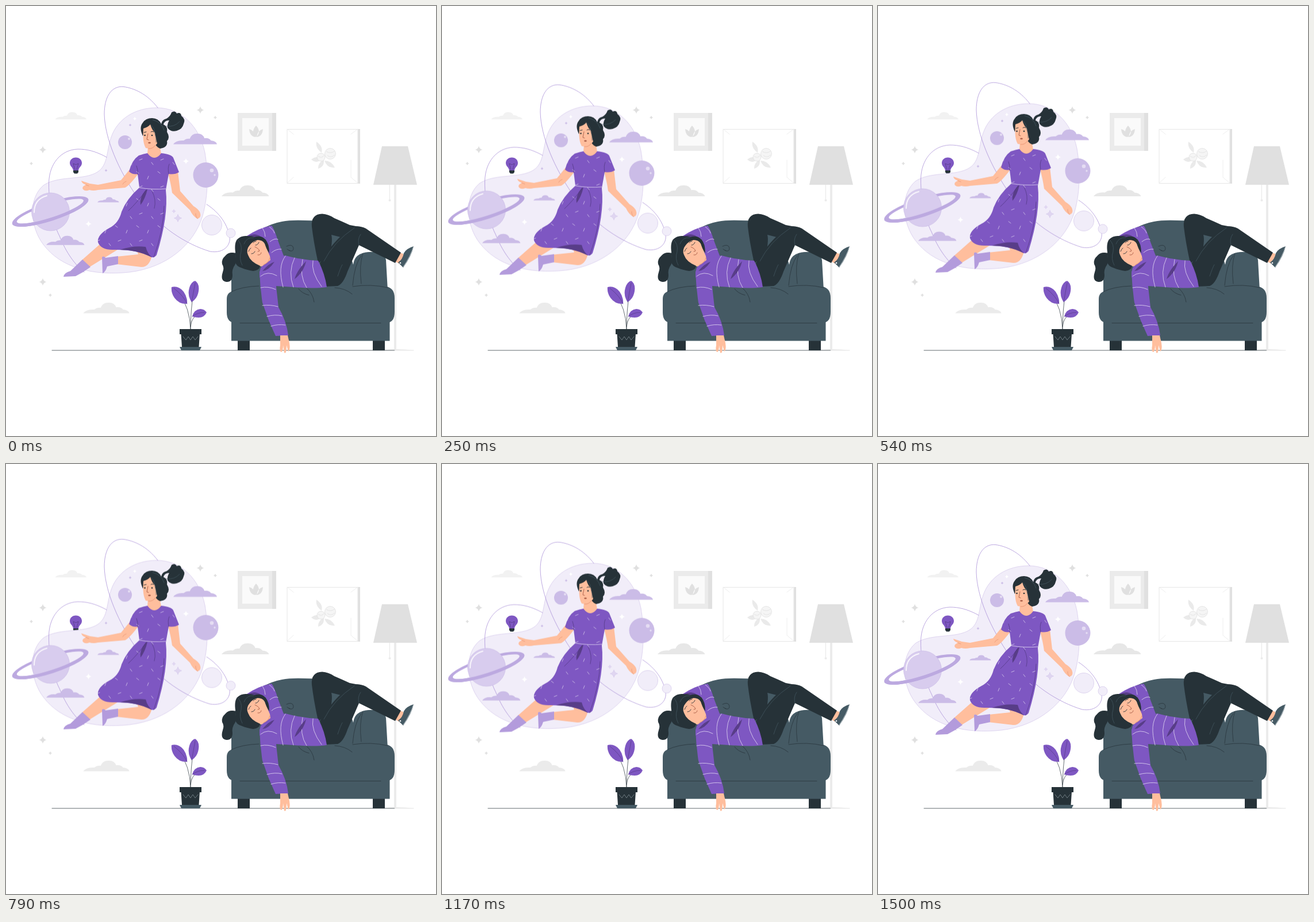
An HTML page without scripts for the animation above (1.54 s loop, 748 by 748 pixels).

```html
<!DOCTYPE html>
<html lang="en">
<head>
<meta charset="utf-8">
<title>Daydream</title>
<style>
  html, body { margin: 0; width: 100%; height: 100%; overflow: hidden; background: #fff; }
  svg { display: block; width: 100%; height: 100%; }
  .dream { animation: float 1540ms linear infinite; }
  @keyframes float {
    0%, 97.4%, 100% { transform: translateY(0); }
    48.7% { transform: translateY(-10px); }
  }
  .purple { fill: #7e57c2; }
  .deep { fill: #583d88; }
  .lilac { fill: #cbbce7; }
  .pale { fill: #e5ddf3; }
  .dark { fill: #263238; }
  .slate { fill: #455a64; }
  .skin { fill: #ffbe9d; }
  .grey { fill: #e0e0e0; }
  .mist { fill: #ebebeb; }
  .white { fill: #fff; }
  .line { fill: none; stroke-linecap: round; stroke-linejoin: round; }
  .ink { stroke: #263238; }
  .orbit { stroke: #ab92d8; stroke-width: .8; }
  .stripe { stroke: #d8ccee; stroke-width: .9; }
  .soft { stroke: #e6e6e6; }
  .seam { stroke: #455a64; stroke-width: .7; }
</style>
</head>
<body>
<svg viewBox="0 0 748 748">
  <defs>
    <path id="cloud" d="M0 19.500Q5 12 19 13Q24 9 30 10Q34 0 45 1Q54 1 57 9Q65 8 69 13Q79 14 80 19.500Z"/>
    <path id="spark" d="M0-6.500Q1.200-1.200 6.500 0Q1.200 1.200 0 6.500Q-1.200 1.200-6.500 0Q-1.200-1.200 0-6.500Z"/>
    <path id="dress" d="M246 256Q258 272 270 256Q288 258 291 264L301 289Q293 294 283 292L278 320Q283 365 262 433Q259 438 253 437Q228 423 185 424Q165 424 160 411Q158 398 180 386Q196 378 201 358Q210 335 232 316L229 292Q221 294 214 288Q219 268 231 260Q240 257 246 256Z"/>
    <pattern id="flecks" width="37" height="47" patternUnits="userSpaceOnUse">
      <path class="line" stroke="#d8ccee" stroke-width=".8" d="M5 6l4 3M26 14l-2 5M10 33l5-2M31 37l3 4"/>
    </pattern>
    <path id="ring" fill="#bca9e0" fill-rule="evenodd" transform="rotate(-18 77 357.500)" d="M7.500 357.500a69.500 16.300 0 0 1 139 0a69.500 16.300 0 0 1-139 0ZM16 357a61 11 0 0 0 122 0a61 11 0 0 0-122 0Z"/>
    <clipPath id="ringFront"><path d="M0 382.500L155 332V400H0Z"/></clipPath>
  </defs>

  <!-- room -->
  <g id="wall">
    <path class="mist" d="M403 186H464V252H403Z"/>
    <path class="grey" d="M463 186H470V252H463Z"/>
    <path fill="#fafafa" d="M411 195H457V243H411Z"/>
    <path class="grey" d="M435 208Q445 219 435 228Q425 219 435 208ZM423 214Q432 216 434 228Q424 227 423 214ZM447 214Q438 216 436 228Q446 227 447 214Z"/>

    <path class="grey" d="M611 214H616V309H611Z"/>
    <path class="soft" fill="#fff" d="M489 214.500H612V308.500H489Z"/>
    <path class="line" stroke="#eee" d="M489 214L500 223M612 214L600 223M489 308L500 298M612 308L600 298V268"/>
    <g fill="#eaeaea">
      <path d="M540 236Q552 244 549 255Q538 248 540 236ZM531 267Q541 259 548 267Q540 275 531 267ZM543 283Q543 271 553 268Q554 280 543 283ZM554 269Q566 269 572 281Q559 283 554 269Z"/>
      <g fill="#f5f5f5" stroke="#ddd" stroke-width=".7">
        <circle cx="548" cy="263" r="7"/><circle cx="564" cy="257" r="9.500"/>
        <path d="M557 253Q565 258 572 252M559 260Q565 265 572 259M543 261Q549 266 553 260"/>
      </g>
    </g>

    <path class="mist" d="M675 310H679V598H675ZM655 599Q677 595 710 599Z"/>
    <path class="grey" d="M654 244H699L715 311H639Z"/>
    <path class="line soft" d="M667.500 311V336"/>
    <circle class="mist" cx="667.500" cy="338" r="2"/>

    <use href="#cloud" fill="#f2f2f2" transform="translate(85.500 184) scale(.68)"/>
    <use href="#cloud" class="mist" transform="translate(134.500 515)"/>
    <use href="#cloud" fill="#e7e7e7" transform="translate(375 311) scale(1.030)"/>
    <g class="grey">
      <use href="#spark" x="338" y="181"/><use href="#spark" x="64" y="250"/><use href="#spark" x="64" y="480"/>
      <use href="#spark" transform="translate(364 194) scale(.5)"/>
      <use href="#spark" transform="translate(44 274) scale(.5)"/>
      <use href="#spark" transform="translate(77 503) scale(.5)"/>
    </g>
    <path class="line" stroke="#626b6f" d="M80 599H676"/>
    <path class="line soft" d="M676 599H709"/>
  </g>

  <g id="plant">
    <path class="line ink" stroke-width=".7" d="M321 562Q321 530 327 490M321 562Q320 525 301 500M321 558Q322 541 337 534"/>
    <g class="purple">
      <path d="M288 489Q300 486 309 497Q316 507 315 518Q300 519 292 506Q287 498 288 489Z"/>
      <path d="M329 478Q337 483 335 496Q333 509 323 515Q315 504 319 490Q322 480 329 478Z"/>
      <path d="M324 540Q327 528 338 527Q345 527 349 533Q345 542 335 542Q329 542 324 540Z"/>
    </g>
    <path class="line" stroke="#50377f" stroke-width=".6" d="M292 491Q309 504 315 518M329 482L323 515M324 540Q333 533 345 533"/>
    <path class="dark" d="M302 562H340V571H302ZM304.500 570H337L335.500 593H306Z"/>
    <path class="slate" d="M302 593H340L337 599H305Z"/>
    <path class="line" stroke="#8b989e" stroke-width=".7" d="M308 575L313 581L317 575L321 581L325 575L329 581L334 575"/>
  </g>

  <g id="sofa">
    <path class="dark" d="M403 581H424V599H403ZM638 581H659V599H638Z"/>
    <path class="slate" d="M392 500V452Q392 432 408 420Q440 382 480 375Q495 372 520 373L565 374Q584 376 589 400L604 450Q606 430 630 428Q658 426 661 442L664 495Z"/>
    <path class="slate" d="M392 540H667.500V582.500H392Z"/>
    <path class="slate" d="M395 496Q440 484 530 486Q610 482 662 488Q676 491 676 508V532Q676 551 662 551H399Q384 551 384 533V510Q384 498 395 496Z"/>
    <path class="line ink" stroke-width=".7" d="M407 551.500H652M618 483Q614 450 621 430M603 486Q606 450 618 434M392 497Q410 488 440 487M664 490Q635 483 603 488M572 490Q590 491 602 501M522 490Q534 500 536 515M509 492Q515 500 527 503M488 418Q498 413 500 421Q500 429 492 425M494 426L489 423"/>
  </g>

  <g id="sleeper">
    <path class="skin" d="M679 427L691 431L693 443L683 448L675 443Z"/>
    <path class="dark" d="M543 447Q535 410 532 384Q530 362 550 361.500Q561 362 571 369Q585 375 598 381L614 384L598 406L566 398Q569 410 562 436Z"/>
    <path class="dark" d="M546 447Q570 407 598 388Q609 379 626 387L687 429L677 447L614 416Q604 439 594 462Q587 483 577 487L556 488Z"/>
    <path class="line seam" d="M553 444Q570 410 606 386M577 470Q582 455 585 450M614 416Q611 405 617 397"/>
    <path class="slate" d="M691 455L682 446Q690 441 692 430Q696 422 709 418Q706 434 691 455Z"/>
    <path class="line" stroke="#b7c1c6" d="M691 454Q704 435 709 418"/>
    <circle class="white" cx="686" cy="447" r="1.300"/>

    <path class="purple" d="M419 400Q440 386 462 382Q467 388 473 408L484 437L459 447L452 406L430 406Z"/>
    <path class="line stripe" d="M446 386Q451 393 451 401M458 384Q466 390 467 395M459 410Q468 403 473 406M462 429Q470 422 479 423"/>
    <path class="deep" d="M421 400Q433 394 443 401L450 408Z"/>
    <path class="purple" d="M441 463Q444 447 457 441L486 434Q515 442 543 443Q555 466 558 489Q535 492 500 489L468 487L441 472Z"/>
    <path class="purple" d="M441 462Q442 490 446 516Q451 530 457 547L469 574L491 573Q488 548 474 524L470 488L476 456Z"/>
    <path class="line stripe" d="M443 470Q455 460 471 469M443 490Q456 487 469 493M446 521Q459 519 473 523M454 540Q468 536 480 539M461 557Q473 553 486 555M486 435Q472 453 482 489M502 438Q490 463 500 489M516 441Q510 470 523 490M534 443Q530 463 549 488"/>
    <path class="deep" d="M522 444Q518 463 502 475Q506 460 522 444ZM446 461Q457 448 467 445Q457 460 446 461Z"/>
    <path class="skin" d="M477 573L477 590Q475 601 479 602Q482 600 482 590L484 603Q488 607 488 590L491 601Q495 599 493 586L490 573Z"/>

    <path class="dark" d="M400 430Q388 427 382 434Q374 441 376 449Q380 455 377 463Q372 479 384 480Q394 480 394 468Q392 459 399 449Z"/>
    <path class="skin" d="M418 428Q419 411 440 404Q449 407 453 421L459 435L460 442L445 453Q428 452 418 428Z"/>
    <path class="dark" d="M400 434Q396 414 402 406Q409 399 419 400Q428 400 432 402Q444 398 451 406Q458 413 458 430Q453 423 450 413Q446 407 438 407Q429 409 424 416Q417 424 421 433Q425 445 442 452Q441 460 430 461Q418 459 411 456Q400 453 398 444Z"/>
    <path class="line seam" d="M403 407Q411 414 409 427Q405 440 411 451M431 403Q418 402 414 414"/>
    <path class="line ink" stroke-width=".9" d="M427 431Q431 431 433 427M434 416Q438 416 440 411M422 427Q423 423 426 421M430 412Q432 409 435 409"/>
    <path class="line" stroke="#a85b45" stroke-width=".9" d="M433 419Q440 422 441 426L438 427M438 433Q443 434 444 429"/>
    <path class="line" stroke="#e99778" d="M448 450Q457 447 459 438"/>
  </g>

  <g id="bulb">
    <path class="purple" d="M121.500 263.500C115 263.500 111 268 111 273C111 279 116 280 117 286H126C127 280 132 279 132 273C132 268 128 263.500 121.500 263.500Z"/>
    <path class="line" stroke="#50377f" stroke-width=".7" d="M120 285L117 274L121.500 276L126 274L123 285"/>
    <path class="dark" d="M117 286H126V289L124 291.500H119L117 289Z"/>
  </g>

  <!-- dream -->
  <g class="dream">
    <path fill="#f1edf9" stroke="#d3c6ea" stroke-width=".7" d="M262 177C305 177 337 210 346 255C352 290 352 330 342 365C327 415 280 455 215 463C150 470 95 455 65 415C42 385 38 335 65 312C90 295 130 303 155 291C178 280 174 255 183 228C194 196 225 177 262 177Z"/>
    <path class="line orbit" d="M264 177C245 152 222 143 205 140.500C182 138 171 160 171 188C172 230 195 285 230 335C265 385 315 415 355 427C380 431 391 415 389 402C385 375 365 355 349 345M175 263C155 252 140 249 125 249C95 250 75 275 74.500 308C74 350 85 385 93 400C105 430 120 450 136 463"/>

    <use href="#ring"/>
    <circle cx="77.500" cy="358" r="33" fill="#d8ccee" stroke="#cbbce7" stroke-width=".7"/>
    <path class="line" stroke="#f8f5fc" stroke-width="2" d="M49 359Q49 336 71 330"/>
    <use href="#ring" clip-path="url(#ringFront)"/>

    <circle class="lilac" cx="207" cy="237" r="12"/>
    <circle class="lilac" cx="347.500" cy="294" r="22"/>
    <g class="pale">
      <circle cx="214" cy="231" r="2"/><circle cx="358" cy="286" r="3.300"/><circle cx="363" cy="294" r="1.700"/>
    </g>
    <g fill="#f1edf9" stroke="#d3c6ea" stroke-width=".7">
      <circle cx="358" cy="381" r="17.500"/><circle cx="391" cy="395" r="8"/>
    </g>
    <g class="lilac">
      <use href="#cloud" transform="translate(291 221) scale(.95 1)"/>
      <use href="#cloud" transform="translate(159 332) scale(.47 .49)"/>
      <use href="#cloud" transform="translate(70 399) scale(.83 .86)"/>
      <use href="#spark" transform="translate(174 286) scale(.4)"/>
      <use href="#spark" transform="translate(216 207) scale(.4)"/>
    </g>
    <g class="white">
      <use href="#spark" transform="translate(143.500 379) scale(.8)"/>
      <use href="#spark" transform="translate(313 270) scale(.8)"/>
      <use href="#spark" transform="translate(224 196) scale(.5)"/>
    </g>
    <g fill="#e0d6f1" stroke="#cbbce7" stroke-width=".5">
      <use href="#spark" x="299" y="369"/><use href="#spark" transform="translate(292 357) scale(.5)"/>
    </g>

    <g id="dreamer">
      <path class="skin" d="M166 412L132 442L142 456L194 424ZM192 436L230 432L226 422L254 434Q249 455 235 454L192 449Z"/>
      <path fill="#b39bdc" d="M133 441L112 461Q101 464 100 471L121 470Q135 463 147 454ZM195 435L173 438Q170 434 167 437L168 465Q173 463 176 453L195 449Z"/>
      <path class="skin" d="M217 282L200 303L160 311L146 309L131 304Q132 309 139 311Q131 314 134 319Q138 323 145 320Q152 322 160 320L207 316Q214 313 230 292ZM282 291Q287 310 289 325L320 355Q325 366 333 370Q341 368 337 358Q333 352 326 348L303 322L299 288Z"/>
      <path class="line" stroke="#e99778" stroke-width=".8" d="M139 311L144 313M333 370Q329 364 330 361M209 305Q205 306 203 310"/>
      <path class="skin" d="M247 244L246 257Q258 274 270 257L266 235Z"/>
      <use href="#dress" class="purple"/>
      <use href="#dress" fill="url(#flecks)"/>
      <path class="deep" d="M198 424Q223 416 243 419Q246 431 254 437Q228 424 198 424ZM243 320Q232 333 234 346Q242 336 246 319Z"/>
      <path class="line" stroke="#50377f" stroke-width=".7" d="M229 293Q230 285 227 278M283 292Q281 281 284 275M257 437Q274 390 275 348M254 322Q262 337 258 352M244 320Q228 342 213 356"/>
      <path class="line stripe" d="M232 316Q255 320 278 318"/>

      <path class="dark" d="M270 211Q269 198 279 196Q286 192 288 185Q294 181 297 187Q304 184 305 191Q313 197 309 205Q307 214 297 217Q287 220 281 212Q280 205 284 199Q273 199 273 212Z"/>
      <path class="dark" d="M238 226Q231 211 238 203Q243 195 254 195Q265 195 270 205Q282 207 280 219Q286 229 280 235Q282 246 268 248Q260 245 257 234L252 210Z"/>
      <path class="skin" d="M239 213Q247 211 251 206Q254 216 259 220Q261 232 263 239L258 245Q251 249 243 247Q237 237 239 213Z"/>
      <path class="line seam" d="M251 206Q258 211 259 222Q262 229 261 237M255 198Q271 202 275 216M279 209Q293 211 302 201"/>
      <path class="line ink" d="M240 220L244 219M252 219Q254 217 257 219"/>
      <g class="dark"><circle cx="241.500" cy="225" r="1.300"/><circle cx="254" cy="225" r="1.300"/></g>
      <path class="line" stroke="#a85b45" stroke-width=".9" d="M247 222L245 232L248 233"/>
      <ellipse cx="249.500" cy="238" rx="2.300" ry="1.300" fill="#a85b45"/>
      <path class="line" stroke="#e99778" d="M248 248Q255 249 260 242"/>
    </g>
  </g>
</svg>
</body>
</html>
```
